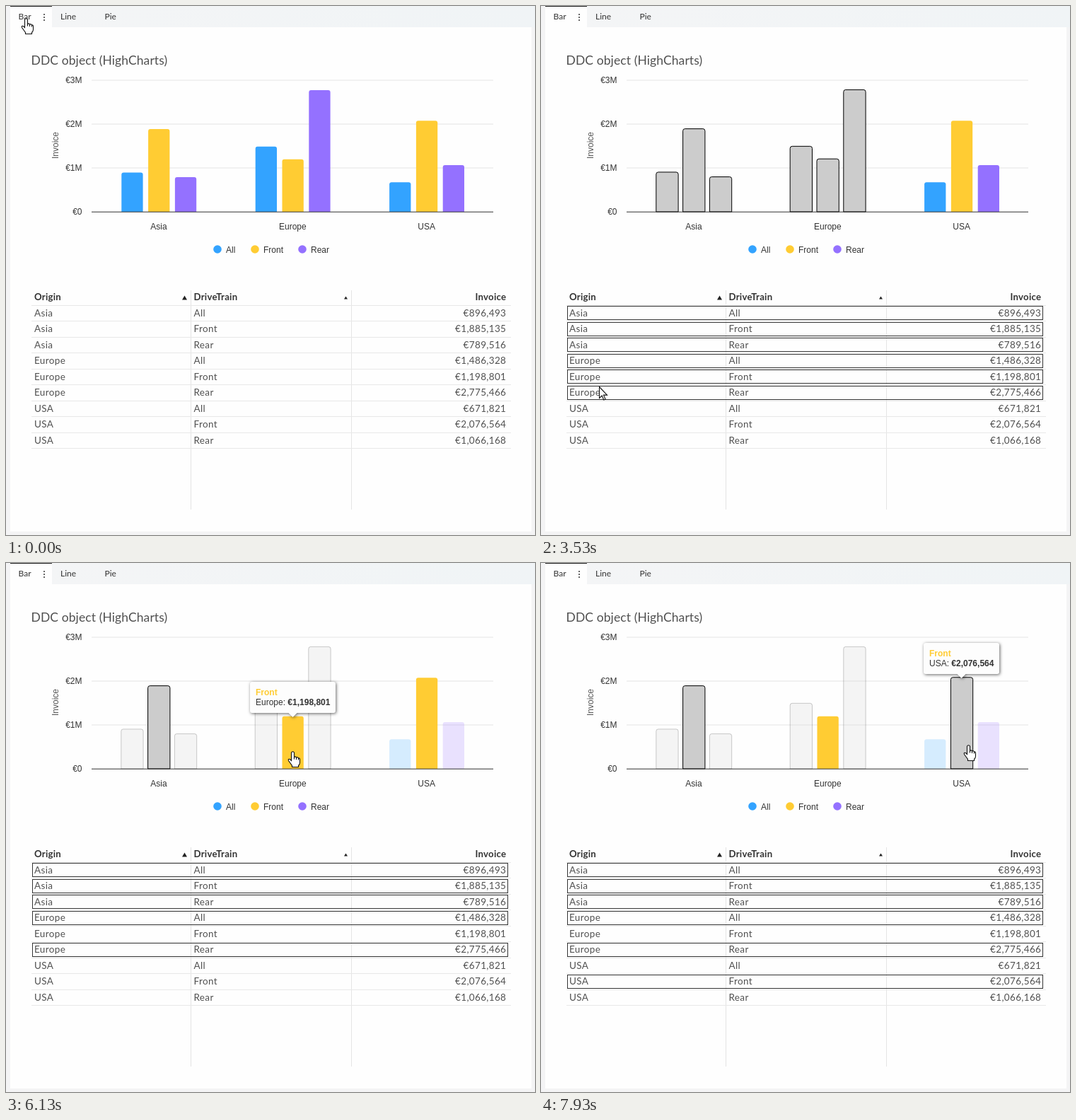
An HTML page with a canvas for the animation above (8000 ms loop, 748x748 px).

```html
<!DOCTYPE html>
<html lang="en">
<head>
<meta charset="utf-8">
<title>Linked chart and table</title>
<style>
  html, body { margin: 0; width: 100%; height: 100%; overflow: hidden; background: #f4f4f5; }
  canvas { display: block; }
</style>
</head>
<body>
<canvas id="stage" width="748" height="748"></canvas>
<script>
const ctx = document.getElementById('stage').getContext('2d');
const LOOP = 8000;
const SANS = '"Liberation Sans", Arial, sans-serif';
const UI = 'Lato, sans-serif';
const origins = ['Asia', 'Europe', 'USA'];
const drives = ['All', 'Front', 'Rear'];
const colors = ['#33a3ff', '#ffcc33', '#9471ff'];
const invoices = [896493, 1885135, 789516, 1486328, 1198801, 2775466, 671821, 2076564, 1066168];

const bars = invoices.map((value, i) => ({
  i, origin: origins[Math.floor(i / 3)], series: i % 3,
  money: '€' + value.toLocaleString('en-US'),
  x: 163.3 + Math.floor(i / 3) * 189.4 + (i % 3) * 37.8,
  y: 291 - value / 3e6 * 186,
  w: 30.3
}));

// Cursor hot spot: time, x, y
const path = [
  [0, 28, 17], [60, 28, 17], [1200, 93, 434], [2060, 93, 434], [2600, 82, 582], [2930, 80, 562],
  [3260, 82, 538], [4060, 82, 538], [4530, 211.5, 454], [5000, 405, 266], [6300, 405, 266],
  [6470, 430, 264], [6710, 545, 260], [6980, 605, 258], [7470, 605, 258], [7530, 604, 257], [LOOP, 604, 257]
];
// Selected rows from a given time on
const selections = [[0, []], [1530, [0]], [3460, [0, 1, 2, 3, 4, 5]], [5800, [0, 1, 2, 3, 5]], [7730, [0, 1, 2, 3, 5, 7]]];
// Hovered bar from a given time on
const hovers = [[4930, 4], [6470, 5], [6700, 6], [6910, 7]];
const FADE = 200;

const clamp = v => Math.max(0, Math.min(1, v));
const selectedAt = t => selections.filter(s => s[0] <= t).pop()?.[1] ?? [];

// Monotone cubic interpolation along the cursor path
function cursorAt(t) {
  const k = Math.max(0, path.findIndex(p => p[0] > t) - 1);
  const slope = (j, d) => path[j] && path[j + 1]
    ? (path[j + 1][d] - path[j][d]) / (path[j + 1][0] - path[j][0]) : 0;
  const tangent = (j, d) => {
    const a = slope(j - 1, d), b = slope(j, d);
    return a * b > 0 ? 2 * a * b / (a + b) : 0;
  };
  const span = path[k + 1][0] - path[k][0], u = (t - path[k][0]) / span;
  return [1, 2].map(d => {
    const a = path[k][d], b = path[k + 1][d];
    return a + (b - a) * u * u * (3 - 2 * u)
      + span * u * (1 - u) * (tangent(k, d) * (1 - u) - tangent(k + 1, d) * u);
  });
}

function hoverState(t) {
  const state = { opacity: [1, 1, 1], alpha: 0, bar: null, x: 0, y: 0 };
  hovers.forEach(([start, index], n) => {
    if (t < start) return;
    const bar = bars[index], end = hovers[n + 1]?.[0] ?? LOOP;
    const p = clamp((Math.min(t, end) - start) / FADE);
    state.opacity = state.opacity.map((o, s) => o + ((s === bar.series ? 1 : 0.2) - o) * p);
    const glide = n ? 1 - (1 - p) ** 1.75 : 1;
    state.x += (bar.x + 15 - state.x) * glide;
    state.y += (bar.y - 49 - state.y) * glide;
    state.alpha = n ? 1 : p;
    state.bar = bar;
  });
  return state;
}

function text(str, x, y, font, color = '#333', align = 'left', spacing = 0) {
  ctx.font = font;
  ctx.letterSpacing = spacing + 'px';
  ctx.fillStyle = color;
  ctx.textAlign = align;
  ctx.fillText(str, x, y);
  ctx.letterSpacing = '0px';
}

function rect(x, y, w, h, color) {
  ctx.fillStyle = color;
  ctx.fillRect(x, y, w, h);
}

function dot(x, y, r, color) {
  ctx.fillStyle = color;
  ctx.beginPath();
  ctx.arc(x, y, r, 0, 7);
  ctx.fill();
}

function triangle(x, y, r) {
  ctx.fillStyle = '#222';
  ctx.beginPath();
  ctx.moveTo(x, y - r);
  ctx.lineTo(x + r + 0.5, y + r);
  ctx.lineTo(x - r - 0.5, y + r);
  ctx.fill();
}

function drawPage() {
  rect(0, 0, 748, 748, '#f4f4f5');
  const strip = ctx.createLinearGradient(0, 0, 748, 0);
  strip.addColorStop(0, '#f4f5f6');
  strip.addColorStop(1, '#f0f4f6');
  rect(6, 0, 742, 30, strip);
  rect(6, 30, 737, 713, '#fefefe');
  rect(6, 0, 59, 30, '#fefefe');
  rect(6, 0, 59, 1, '#222');
  text('Bar', 17.5, 19, '12px ' + UI);
  text('Line', 77, 19, '12px ' + UI);
  text('Pie', 139.5, 19, '12px ' + UI);
  for (const y of [12, 16, 20]) dot(54, y, 1, '#333');
  text('DDC object (HighCharts)', 35.5, 83, '17.5px ' + UI, '#505050', 'left', 0.1);
}

function drawChart(selected, hover) {
  for (let n = 0; n < 4; n++) {
    const y = 291 - 62 * n;
    if (n) rect(121, y - 0.5, 568, 1, '#e6e6e6');
    text('€' + n + (n ? 'M' : ''), 107.5, y + 4, '12px ' + SANS, '#333', 'right');
  }
  ctx.save();
  ctx.translate(74, 197);
  ctx.rotate(-Math.PI / 2);
  text('Invoice', 0, 0, '12px ' + SANS, '#555', 'center');
  ctx.restore();

  for (const bar of bars) {
    const picked = selected.includes(bar.i);
    ctx.globalAlpha = hover.opacity[bar.series];
    ctx.fillStyle = picked ? '#ccc' : colors[bar.series];
    ctx.beginPath();
    const grow = picked ? 0.5 : 0;
    ctx.roundRect(bar.x - grow, bar.y - grow, bar.w + 2 * grow, 291 - bar.y + grow, [3, 3, 0, 0]);
    ctx.fill();
    if (picked) {
      ctx.strokeStyle = '#000';
      ctx.lineWidth = 1;
      ctx.stroke();
    }
  }
  ctx.globalAlpha = 1;
  rect(121, 290.7, 568, 1, '#333');
  origins.forEach((name, n) => text(name, 216 + 189.3 * n, 316, '12px ' + SANS, '#333', 'center'));
  drives.forEach((name, n) => {
    const x = [299, 352, 419][n];
    dot(x, 344, 5.8, colors[n]);
    text(name, x + 12, 349, '12px ' + SANS);
  });
}

function drawTable(selected) {
  const head = (str, x, align) => text(str, x, 416, 'bold 13.2px ' + UI, '#333', align, 0.25);
  const cell = (str, x, y, align) => text(str, x, y, '13.5px ' + UI, '#505050', align, 0.35);
  head('Origin', 40);
  head('DriveTrain', 265.5);
  head('Invoice', 707.3, 'right');
  triangle(252.5, 412.5, 3);
  triangle(480.5, 412.5, 2);
  rect(261, 402, 1, 310, '#e4e4e4');
  rect(488, 402, 1, 310, '#e4e4e4');
  for (let n = 0; n < 10; n++) rect(36, Math.floor(423 + 22.5 * n), 678, 1, '#e8e8e8');
  for (const bar of bars) {
    const y = 438.5 + 22.5 * bar.i;
    cell(bar.origin, 40, y);
    cell(drives[bar.series], 265.5, y);
    cell(bar.money, 707.3, y, 'right');
    if (selected.includes(bar.i)) {
      ctx.strokeStyle = '#333';
      ctx.lineWidth = 1;
      ctx.strokeRect(37.5, Math.floor(y - 14) + 0.5, 672, 19);
    }
  }
}

function drawTooltip({ bar, x, y, alpha }) {
  if (!bar) return;
  const label = bar.origin + ': ';
  ctx.font = '12px ' + SANS;
  const labelWidth = ctx.measureText(label).width;
  ctx.font = 'bold 12px ' + SANS;
  const w = Math.round(labelWidth + ctx.measureText(bar.money).width + 16);
  const left = Math.round(x - w / 2), top = Math.round(y);
  ctx.save();
  ctx.globalAlpha = alpha;
  ctx.translate(left, top);
  const shape = new Path2D(`M3 0H${w - 3}Q${w} 0 ${w} 3V41Q${w} 44 ${w - 3} 44H${w / 2 + 6}l-6 6l-6-6H3Q0 44 0 41V3Q0 0 3 0Z`);
  ctx.shadowColor = 'rgba(0,0,0,.6)';
  ctx.shadowBlur = 4;
  ctx.shadowOffsetX = ctx.shadowOffsetY = 1;
  ctx.fillStyle = '#fdfdfd';
  ctx.fill(shape);
  ctx.shadowColor = 'transparent';
  text(drives[bar.series], 8, 19, 'bold 12px ' + SANS, colors[bar.series]);
  text(label, 8, 33, '12px ' + SANS);
  text(bar.money, 8 + labelWidth, 33, 'bold 12px ' + SANS);
  ctx.restore();
}

const arrow = new Path2D('M0 0V16L3.7 12.5L6.3 18.5L8.6 17.5L6 11.6H11Z');
const hand = new Path2D('M-2 1.5Q0-1 2 1.5V8Q4 6.5 5 8.5Q7 7.5 8 9.5Q10 9 10 11.5V16Q10 18 8 20V22H-1V20L-6 13Q-7 10-4 11L-2 13Z');
const knuckles = new Path2D('M2 8v3M5 8.5v3M8 9.5v2.5');

function drawCursor([x, y]) {
  const pointing = y < 30 || bars.some(b => x >= b.x && x <= b.x + b.w && y >= b.y && y < 291);
  ctx.save();
  ctx.translate(x + 0.5, y + 0.5);
  ctx.fillStyle = '#fff';
  ctx.strokeStyle = '#111';
  ctx.lineWidth = 1.1;
  ctx.fill(pointing ? hand : arrow);
  ctx.stroke(pointing ? hand : arrow);
  if (pointing) ctx.stroke(knuckles);
  ctx.restore();
}

function frame() {
  const t = performance.now() % LOOP;
  const hover = hoverState(t);
  drawPage();
  drawChart(selectedAt(t - 65), hover);
  drawTable(selectedAt(t));
  drawTooltip(hover);
  drawCursor(cursorAt(t));
  requestAnimationFrame(frame);
}
frame();
</script>
</body>
</html>
```
